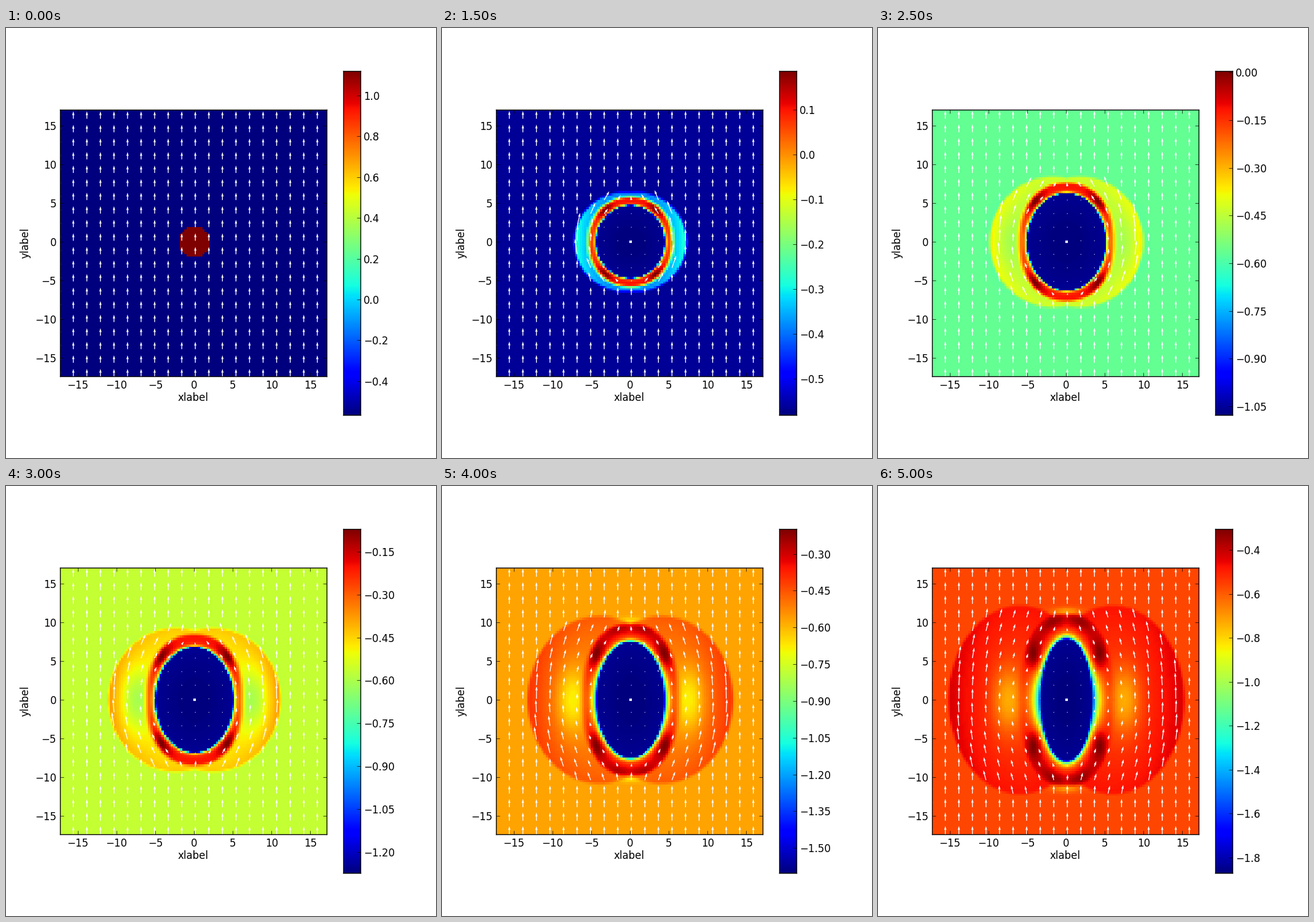
These frames come from a looping animation (700x700 px, 5500 ms). A matplotlib script:

```python
import numpy as np
import matplotlib.pyplot as plt
from matplotlib.animation import FuncAnimation

plt.rcParams.update({
    "font.family": "DejaVu Sans", "font.size": 12, "axes.linewidth": 1.0,
    "axes.axisbelow": False, "text.hinting": "auto",
    "text.hinting_factor": 8, "text.kerning_factor": 6,
})

STEPS = 11
N = 118                      # visible cells per side
H = 35 / 120                 # cell size
X0 = -17.5 + H / 2
END = X0 + N * H
BACKGROUND = -0.566

cells = np.arange(N)
axis = (cells - 59) * H
X, Y = np.meshgrid(axis, axis)
AX, AY = abs(X), abs(Y)
R = np.hypot(X, Y) + 1e-6
COS, SIN = AX / R, AY / R
ANGLE = np.degrees(np.arctan2(AY, AX))


def smooth(t):
    t = np.clip(t, 0, 1)
    return t * t * (3 - 2 * t)


def bell(v, center, width):
    return np.exp(-((v - center) / width) ** 2 / 2)


def mix(side, top):
    return side + (top - side) * SIN ** 2


def oval(a, b, n=2):
    """Distance to a superellipse along each cell's ray."""
    return ((COS / a) ** n + (SIN / b) ** n) ** (-1 / n)


def core_value(k):
    return -0.85 - 1.472 * np.log((k + 2) / 6)


def limits(k):
    low = min(BACKGROUND, core_value(k))
    high = 0.303 - 0.636 * np.log((k + 3) / 5) if k else 1.12
    return low, high


def start():
    return (R < 2).astype(float), np.zeros((N, N)), np.ones((N, N))


def blast(k, low, high):
    span = high - low
    base = (BACKGROUND - low) / span
    core = (core_value(k) - low) / span
    age = k / 10

    # outer wave: two ellipses drifting apart sideways
    shift = 0.1 * k + 0.05 * k ** 2
    rx = 5.65 * (k / 2) ** 0.615 - shift
    ry = 5.15 * (k / 2) ** 0.535
    s = np.hypot((AX - shift) / rx, AY / ry) + 1e-6
    depth = (1 - s) * rx
    amp = 1.9 / (k + 3.4) / span * (1 - 0.35 * (AY / ry / s) ** 2)
    u = base + amp * smooth(depth / 0.5 + 0.5) * np.exp(-np.maximum(depth, 0) / 6)
    u -= 0.13 * smooth((k - 4) / 2.2) * bell(AX, 7.6, 1.4) * bell(AY, 0, 2.9)

    # cavity, first round, then squeezed by the field
    squeeze = max(k - 2, 0)
    hole_y = 8.4 * (1 - np.exp(-k / 3.7))
    hole = oval(hole_y * (1 - 0.06 * squeeze - 0.0016 * squeeze ** 2), hole_y)

    # dense shell with dark shoulders and polar caps
    rim_y = 3.2 * k ** 0.54
    rim = oval(6.5 * (1 - np.exp(-k / 1.6)) - 0.55 * age ** 2, rim_y, 2 + 0.5 * age)
    t = (R - hole) / (rim - hole)
    cap = 0.09 * smooth((k - 6) / 3)
    shell = mix(0.865, 0.89)
    shell = shell + 0.13 * bell(ANGLE, 50 + 4 * age, 8) * bell(t, 0.6, 0.28)
    shell = shell + cap * bell(ANGLE, 80, 8) * bell(t, 0.8, 0.18)
    soft = mix(0.3 + 0.5 * age, 0.28)
    u += (shell - u) * (1 - smooth((R - rim + soft) / (2 * soft)))
    u -= cap * bell(AX, 0, 1.2) * bell(AY, rim_y + 0.35, 0.35)

    edge = 0.15 + 0.6 * age ** 3
    fade = np.exp(-np.maximum(R - hole, 0) / mix(edge, 0.6 * edge))
    u += (core + 0.02 * np.minimum(R / hole, 1) ** 2 - u) * fade

    # field pushed out of the cavity, with its flux kept
    gap = np.maximum(R - hole, 0)
    left = np.maximum(np.maximum(depth, 1.03 * rim - R), 0)
    m = 0.03 + 0.97 * gap / (gap + left + 1e-9)
    my, mx = np.gradient(m, H)
    return np.clip(u, 0, 1), -X * my / 2, m + X * mx / 2


fig = plt.figure(figsize=(7, 7), dpi=100, facecolor="white")
ax = fig.add_axes([0.125, 0.19, 0.62, 0.62])
bar = fig.add_axes([0.78375, 0.1, 0.04, 0.8])

image = ax.imshow(np.zeros((N, N)), cmap="jet", vmin=0, vmax=1, origin="lower",
                  extent=(X0, END, X0, END), aspect="auto",
                  interpolation="nearest")
spots = X0 + H * cells[::6]
arrows = ax.quiver(spots, spots, np.zeros((20, 20)), np.ones((20, 20)),
                   color="white", scale=36, width=0.003, pivot="tail")
ax.set(xlim=(X0, END), ylim=(X0, END),
       xticks=range(-15, 16, 5), yticks=range(-15, 16, 5))
ax.tick_params(direction="in", top=True, right=True, length=4, width=0.5, pad=4)
ax.set_ylabel("ylabel", labelpad=5)
fig.text(304.5 / 700, 1 - 607 / 700, "xlabel", ha="center", va="baseline")

bar.imshow(np.linspace(0, 1, 256)[:, None], cmap="jet", origin="lower",
           extent=(0, 1, 0, 1), aspect="auto", interpolation="nearest")
bar.set_xticks([])
bar.yaxis.tick_right()
bar.tick_params(direction="in", length=4, width=0.5, pad=4)


def label_bar(low, high):
    span = high - low
    step, digits = (0.1, 1) if span < 1 else (0.15, 2) if span < 1.43 else (0.2, 1)
    ticks = step * np.arange(np.ceil(low / step), np.floor(high / step) + 1)
    names = [f"{v:.{digits}f}".replace("-", "\u2212") for v in ticks]
    bar.set_yticks((ticks - low) / span, names)
    bar.set_ylim(0, 1)


def draw(k):
    low, high = limits(k)
    level, bx, by = blast(k, low, high) if k else start()
    image.set_data(level)
    bx, by = bx[::6, ::6], by[::6, ::6]
    arrows.scale = 36 * np.hypot(bx, by).mean()
    arrows.set_UVC(bx, by)
    label_bar(low, high)
    return image, arrows


anim = FuncAnimation(fig, draw, frames=STEPS, interval=500, repeat=True,
                     repeat_delay=0, blit=False)
plt.show()
```
